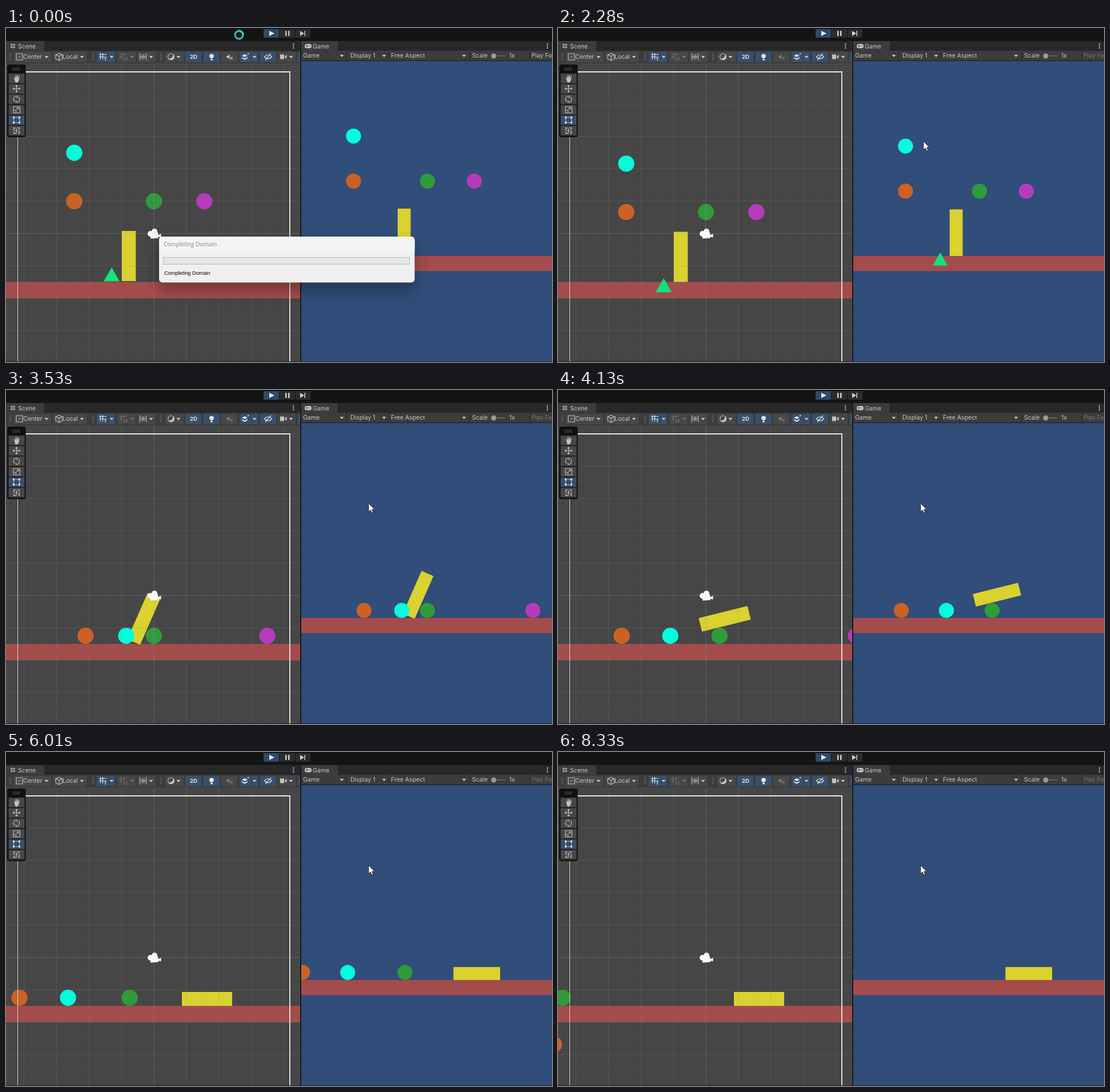
Write an HTML page that moves like this. It is 956 px wide and 586 px high and loops after 8.4 s.

```html
<!DOCTYPE html>
<html lang="en">
<head>
<meta charset="utf-8">
<title>Physics scene</title>
<style>
  html, body { margin: 0; width: 100%; height: 100%; overflow: hidden; background: #191919; }
  svg { display: block; width: 956px; height: 586px; }
  text { font: 10.5px Inter, sans-serif; fill: #c8c8c8; }
  .bar { fill: #3c3c3c; }
  .btn { fill: #474747; }
  .on { fill: #37506d; }
  .ico { fill: none; stroke: #bdbdbd; stroke-width: 1.2; }
  .solid { fill: #c4c4c4; }
  .off { opacity: .4; }
  #dialog { filter: drop-shadow(0 13px 13px rgba(0, 0, 0, .3)); }
  #dialog text { font: 10px "Open Sans", sans-serif; fill: #858585; }
  #dialog .body { font: 9.2px "Liberation Sans", Arial, sans-serif; fill: #000; }
</style>
</head>
<body>
<svg viewBox="0 0 956 586">
  <defs>
    <clipPath id="sceneClip"><path d="M0 62H515V585H0z"/></clipPath>
    <clipPath id="gameClip"><path d="M517 58H956V585H517z"/></clipPath>
    <path id="drop" class="solid" d="M-3.5 -2H3.5L0 2z"/>
  </defs>

  <!-- panels -->
  <rect width="956" height="586" fill="#191919"/>
  <rect width="956" height="22" fill="#141414"/>
  <path fill="#282828" d="M0 23H515V40H0zM517 23H956V40H517z"/>
  <path class="bar" d="M0 23H67V40H515V62H0zM517 23H581V40H956V57H517z"/>

  <!-- scene view -->
  <g clip-path="url(#sceneClip)">
    <path fill="#464646" d="M0 62H515V585H0z"/>
    <g id="world">
      <path fill="#a34c4c" d="M-20 445.5H540V474H-20z"/>
      <rect id="box" x="-12.25" y="-44" width="24.5" height="88" fill="#dad22f"/>
      <path id="tri" fill="#10e47c" d="M185 420L199 444.5H171z"/>
      <circle id="orange" r="14.2" fill="#cd6123"/>
      <circle id="cyan" r="14.2" fill="#00ffdc"/>
      <circle id="green" r="14.2" fill="#2f9b3b"/>
      <circle id="purple" r="14.2" fill="#b63bbb"/>
    </g>
    <path id="minor" stroke="#808080" stroke-opacity=".1"/>
    <path id="major" stroke="#808080" stroke-opacity=".24"/>
    <path stroke="#969696" stroke-opacity=".38" d="M259 62V585M0 360.5H515"/>
    <path fill="none" stroke="#d2d2d2" d="M20.5 585V77"/>
    <path fill="none" stroke="#e8e8e8" stroke-width="1.8" d="M20 77H497V585"/>
    <g fill="#fafafa">
      <circle cx="253" cy="361" r="5"/><circle cx="260" cy="357" r="5"/>
      <path d="M252 360L266 358.5L267 368.5L253 369.5zM266 363.5L271.500 361V367.500L266 366z"/>
    </g>
  </g>

  <!-- game view -->
  <g clip-path="url(#gameClip)">
    <path fill="#314d79" d="M517 58H956V585H517z"/>
    <use href="#world" transform="matrix(.9285 0 0 .9285 497.5 -13.65)"/>
  </g>

  <!-- play controls -->
  <path fill="#2c2c2c" d="M479 2H506V17H479zM507 2H533V17H507z"/>
  <path fill="#2c4a6b" d="M451 2H478V17H451z"/>
  <path fill="#f0f0f0" d="M461 5L470 9.500L461 14z"/>
  <path id="steps" d="M489 5h2.500v9h-2.500zM494 5h2.500v9h-2.500zM515 5L522 9.500L515 14zM522.500 5h1.500v9h-1.500z"/>

  <!-- tabs -->
  <path class="ico" d="M10 27V36M14 27V36M7.500 29.500H16.500M7.500 33.500H16.500"/>
  <text x="21" y="36">Scene</text>
  <rect class="solid" x="523" y="28" width="12" height="7.500" rx="3.500"/>
  <path stroke="#3c3c3c" d="M525 31.500h4M527 29.500v4M531 31.500h2"/>
  <text x="537" y="36">Game</text>
  <path class="solid" d="M502.300 27h2v2h-2zm0 3.500h2v2h-2zm0 3.500h2v2h-2zM947 27h2v2h-2zm0 3.500h2v2h-2zm0 3.500h2v2h-2z"/>

  <!-- scene toolbar -->
  <path stroke="#5c5c5c" d="M6.500 44V57M8.500 44V57M151.500 44V57M153.500 44V57M270.500 44V57M272.500 44V57"/>
  <path class="btn" d="M14 42H79V60H14zM83 42H141V60H83zM195 42H227V60H195zM230 42H262V60H230zM279 42H311V60H279zM377 42H405V60H377zM476 42H507V60H476z"/>
  <path class="on" d="M159 42H191V60H159zM314 42H342V60H314zM346 42H374V60H346zM409 42H441V60H409zM445 42H473V60H445zM511 42H515V60H511z"/>
  <path stroke="#2c3e54" d="M179.500 42V60M429.500 42V60"/>
  <path class="ico" d="M18 45H29V56H18z"/>
  <path stroke="#d0604c" d="M20.500 54L26.500 47.500"/><circle cx="23.500" cy="50.500" r="1.800" fill="#d0604c"/>
  <text x="30" y="54">Center</text>
  <path class="ico" d="M87 47L93 44.500L98.500 47V54L93 57L87 54zM87 47L93 49.500L98.500 47M93 49.500V57"/>
  <text x="99" y="54">Local</text>
  <path class="ico" style="stroke:#e2e2e2" d="M165.500 44V55M169.500 44V55M163 46.500H176M163 50.500H171M172 50L174 53L176 50M174 53V57"/>
  <g class="off">
    <path class="ico" stroke-dasharray="2 1" d="M199 46.500H211M199 50.500H205M201.500 44V56M206.500 44V49"/>
    <path class="ico" d="M206.500 51V55Q209 58.500 211.500 55V51"/>
    <use href="#drop" x="221" y="51"/>
  </g>
  <path class="ico" d="M234.500 44.500V56.500M245.500 44.500V56.500M238.500 46V55M241.500 46V55M234 50.500H246"/>
  <circle class="ico" cx="289" cy="50.500" r="5.500"/>
  <path class="solid" d="M293 46A6 6 0 0 1 284 54Q292 54 293 46z"/>
  <text x="322" y="54" style="font-weight:700;font-size:9.500px;fill:#e2e2e2">2D</text>
  <path fill="#e4e4e4" d="M358 53Q355 50 356.500 47Q360 43.500 363.500 47Q365 50 362 53zM358 54h4v2.500h-4z"/>
  <g id="mute">
    <path class="solid" d="M386 49h2.500l3-3v9l-3-3H386z"/>
    <path class="ico" d="M393 51L396.500 55M396.500 51L393 55"/>
  </g>
  <path fill="#e4e4e4" d="M413 48.500L418 46L423 48.500L418 51zM413 51L418 53.500L423 51V53L418 56L413 53zM423 44h2v2h-2z"/>
  <path class="ico" style="stroke:#e2e2e2" d="M452.500 50.500Q459 43.500 465.500 50.500Q459 57.500 452.500 50.500zM454 56L464 45"/>
  <path class="solid" d="M480 46.500h7v8h-7zM488 50L491.500 47V54L488 51z"/>
  <g>
    <use href="#drop" x="71" y="51"/><use href="#drop" x="133" y="51"/><use href="#drop" x="185" y="51"/>
    <use href="#drop" x="254" y="51"/><use href="#drop" x="302" y="51"/><use href="#drop" x="435" y="51"/>
    <use href="#drop" x="499" y="51"/>
  </g>

  <!-- game toolbar -->
  <path stroke="#252525" d="M596.500 40V57M669.500 40V57M811.500 40V57M917.500 40V57"/>
  <text x="520" y="52">Game</text><use href="#drop" x="588" y="49"/>
  <text x="603" y="52">Display 1</text><use href="#drop" x="662" y="49"/>
  <text x="674" y="52">Free Aspect</text><use href="#drop" x="802" y="49"/>
  <text x="816" y="52">Scale</text>
  <path stroke="#6a6a6a" stroke-width="1.500" d="M850 49H875"/>
  <circle cx="854" cy="49" r="4.500" fill="#9a9a9a"/>
  <text x="881" y="52">1x</text>
  <text id="focus" x="920" y="52">Play Focused</text>

  <!-- tool palette -->
  <rect x="2" y="64" width="32.500" height="127.500" rx="3" fill="#111"/>
  <path stroke="#5a5a5a" d="M11 70.500H25M11 73.500H25"/>
  <path class="btn" d="M4.500 80h28v17h-28zm0 18.300h28v17h-28zm0 18.300h28v17h-28zm0 18.300h28v17h-28zm0 36.600h28v17h-28z"/>
  <path class="on" d="M4.500 153.200h28v17h-28z"/>
  <path class="solid" d="M14 86.500l1.500-.5 1.500 3-.5-6h1.500l.7 5.500.8-6h1.500l-.2 6.500 1.700-4.500 1.300.5-1.500 7-2 3.500h-4z"/>
  <path class="ico" d="M18.500 101V112.500M12.500 106.500H24.500M16.500 102.500L18.500 100.500L20.500 102.500M16.500 110.500L18.500 112.500L20.500 110.500M14.500 104.500L12.500 106.500L14.500 108.500M22.500 104.500L24.500 106.500L22.500 108.500"/>
  <path class="ico" d="M15 129A5.500 5.500 0 0 1 19 119.500M22 121A5.500 5.500 0 0 1 18 130.500M16 119.500H19.500V123M21 130.500H17.500V127"/>
  <path class="ico" d="M13 138H24.500V149H13zM13 144.500H17.500V149M18.500 143L22 140M19.500 140H22V142.500"/>
  <path class="ico" style="stroke:#f0f0f0" stroke-dasharray="2 1.300" d="M13.500 157H23.500V166H13.500z"/>
  <path fill="#f0f0f0" d="M12 155.500h3v3h-3zm10 0h3v3h-3zm-10 9h3v3h-3zm10 0h3v3h-3z"/>
  <circle class="ico" cx="18.500" cy="180" r="5.500" stroke-dasharray="6 2.600"/>
  <path class="ico" d="M18.500 176V184M14.500 180H22.500M13 174.500L15 176.500M24 174.500L22 176.500M13 185.500L15 183.500M24 185.500L22 183.500"/>

  <!-- dialog -->
  <g id="dialog">
    <rect x="268" y="366" width="447.500" height="80.500" rx="6" fill="#f0f0f0"/>
    <path fill="#f4f4f4" d="M274 366H709.500Q715.500 366 715.500 372V392H268V372Q268 366 274 366z"/>
    <text x="276" y="383">Completing Domain</text>
    <rect x="275.500" y="402.500" width="431" height="12" fill="#e5e5e5" stroke="#bcbcbc"/>
    <text class="body" x="277" y="433">Completing Domain</text>
  </g>

  <!-- pointers -->
  <g id="busy" fill="none" stroke-width="3.300">
    <circle r="7" stroke="#2bb6ad"/>
    <path stroke="#37cabf" d="M0 -7A7 7 0 0 1 7 0"/>
  </g>
  <path id="arrow" fill="#fff" stroke="#222" stroke-width=".8" d="M0 0V14.500L3.300 11.500L5.500 16.500L7.800 15.500L5.600 10.700L10 10.500z"/>
</svg>
<script>
const LOOP = 8400, FLOOR = 431.2, KICK = 2618;
const $ = id => document.getElementById(id);

// Grid around the world origin, one line per unit
const grid = { major: '', minor: '' };
for (let i = -11; i <= 10; i++) {
  if (!i) continue;
  const x = Math.round(258.5 + i * 28.4) + .5, y = Math.round(360 + i * 28.4) + .5;
  grid[i % 2 ? 'minor' : 'major'] += `M${x} 62V585M0 ${y}H515`;
}
for (const id in grid) $(id).setAttribute('d', grid[id]);

// Monotone cubic through rows of [time, ...values]
function track(...keys) {
  const secant = (i, c) => (keys[i + 1][c] - keys[i][c]) / (keys[i + 1][0] - keys[i][0]);
  const slope = (i, c) => {
    if (!i) return secant(0, c);
    if (i === keys.length - 1) return secant(i - 1, c);
    const a = secant(i - 1, c), b = secant(i, c);
    return a * b > 0 ? 2 * a * b / (a + b) : 0;
  };
  return t => {
    const last = keys[keys.length - 1];
    if (t <= keys[0][0]) return keys[0].slice(1);
    if (t >= last[0]) return last.slice(1);
    const i = keys.findIndex(k => k[0] > t) - 1, a = keys[i], b = keys[i + 1];
    const h = b[0] - a[0], u = (t - a[0]) / h, v = 1 - u;
    return a.slice(1).map((p, n) => {
      const c = n + 1;
      return p * v * v * (1 + 2 * u) + b[c] * u * u * (3 - 2 * u)
        + h * u * v * (v * slope(i, c) - u * slope(i + 1, c));
    });
  };
}

const fall = t => 131 * (Math.max(0, t - 1900) / 1000) ** 2;

// Free fall from (x, y) until a given time, then a keyed path
const ball = (x, y, until, path) => t => t < until ? [x, y + fall(t)] : path(t);

const balls = {
  cyan: ball(119.5, 219, KICK, track(
    [KICK, 119.5, 286.5], [2830, 184, 343], [2900, 194, 352], [3240, 203, FLOOR],
    [3600, 211, FLOOR], [3740, 209, FLOOR], [4130, 197, FLOOR], [6010, 109, FLOOR],
    [7480, 42, FLOOR], [7640, 34.7, FLOOR], [8330, -23, FLOOR])),
  orange: ball(119.5, 304, KICK, track(
    [KICK, 119.5, 371.5], [2900, 131, 410], [3010, 135, FLOOR], [3400, 142, FLOOR],
    [3740, 130, FLOOR], [4130, 112, FLOOR], [6010, 24, FLOOR], [6900, -18, FLOOR],
    [7300, -30, FLOOR], [8190, -20, 480], [8260, -12, 495], [8330, -7, 513])),
  green: ball(259, 304, 2901, track(
    [2901, 259, 435], [2970, 259, FLOOR], [3700, 259, FLOOR], [4130, 282.5, FLOOR],
    [4630, 301, FLOOR], [5150, 305, FLOOR], [5400, 288, FLOOR], [5600, 258, FLOOR],
    [6010, 217.5, FLOOR], [7480, 79.5, FLOOR], [7640, 64.5, FLOOR], [8330, 8, FLOOR])),
  purple: t => {
    const air = Math.min(Math.max(t - KICK, 0), 282), roll = Math.max(t - 2900, 0);
    return [347.3 + air * .157 + roll * .105, t < 2901 ? 304 + fall(t) : FLOOR];
  }
};

const box = track(
  [1900, 215, 400, 0], [2010, 215, 401.5, 0], [2690, 215, 401.5, 0], [2900, 219.3, 400, 5],
  [3740, 252, 402, 33], [4130, 291, 401.5, 75], [4400, 318, 405, 100], [4630, 338, 412, 120],
  [5250, 350, 415.5, 116], [5530, 352, 425, 101], [5630, 352, 433.3, 90]);

const pointer = track([2000, 408, 12], [2210, 640, 199], [2290, 640, 199], [2500, 635, 199]);

const bursts = [0, 2000, 2900, 3790, 4700, 5600, 6500, 7410, 8260];
function tick(t) {
  const from = bursts.filter(b => b <= t).pop();
  return from + Math.floor((t - from + 15) / 70) * 70;
}

const move = (id, [x, y, a = 0]) =>
  $(id).setAttribute('transform', `translate(${x} ${y}) rotate(${a})`);
const show = (id, on) => $(id).setAttribute('opacity', on);

function draw(now) {
  const t = tick(now);
  for (const id in balls) move(id, balls[id](t));
  move('box', box(t));
  move('tri', [0, fall(t)]);

  move('busy', [408, 12, t * .36]);
  show('busy', now < 950 ? 1 : 0);
  move('arrow', pointer(t));
  show('arrow', now < 950 ? 0 : 1);

  const fade = now < 950 ? 1 : Math.max(0, .8 - .2 * Math.floor((now - 950) / 62.5));
  show('dialog', fade);
  $('steps').setAttribute('fill', now < 1610 ? '#c0c0c0' : '#d4d4d4');
  show('mute', now < 1810 ? 1 : .4);
  show('focus', now < 1810 ? 1 : .4);
}

const start = performance.now();
(function loop() {
  draw((performance.now() - start) % LOOP);
  requestAnimationFrame(loop);
})();
</script>
</body>
</html>
```
